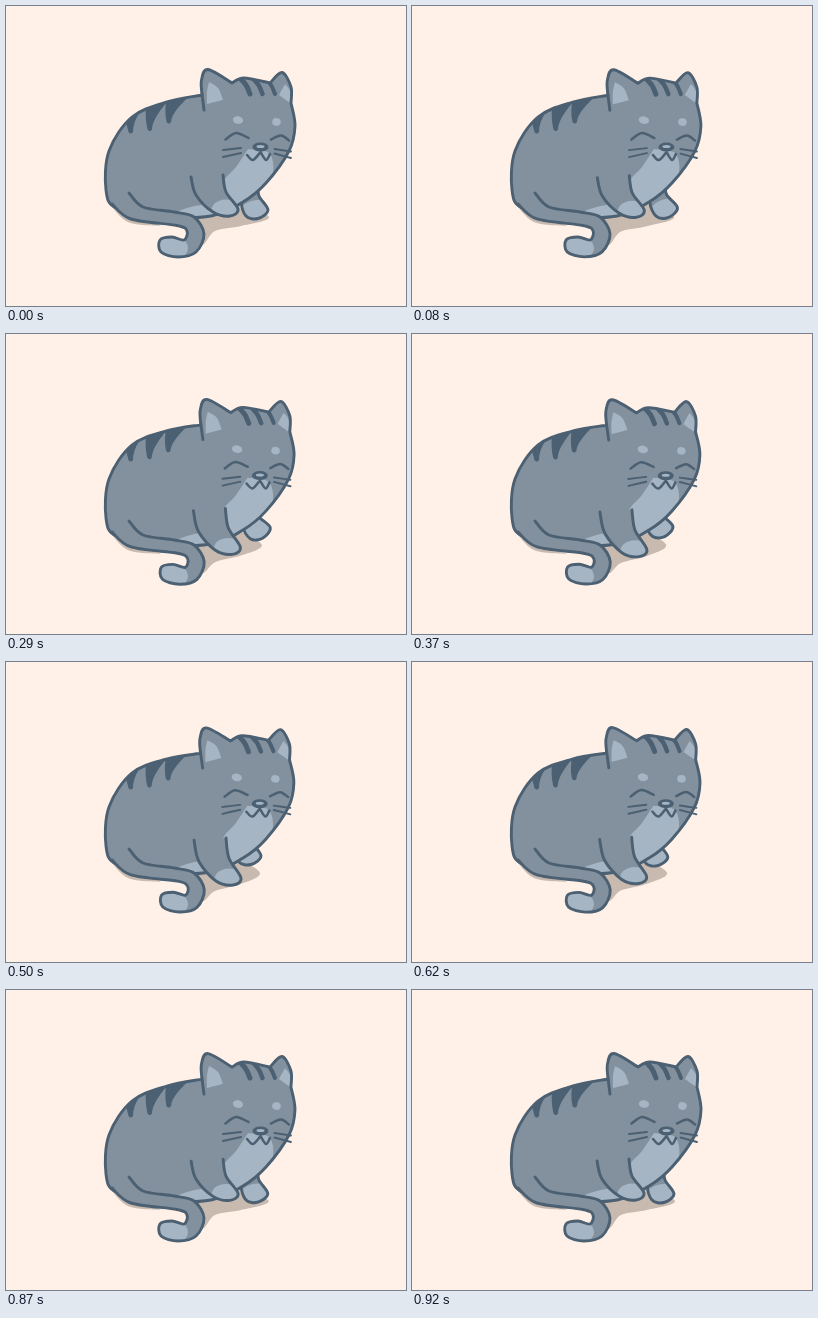
An HTML page with a canvas for the animation above (960 ms loop, 400 by 300 pixels).

```html
<!DOCTYPE html>
<html lang="en">
<head>
<meta charset="utf-8">
<title>Kneading cat</title>
<style>
html, body { margin: 0; width: 100%; height: 100%; overflow: hidden; background: #fff1e8; }
canvas { display: block; width: 400px; height: 300px; }
</style>
</head>
<body>
<canvas id="stage" width="400" height="300"></canvas>
<script>
const ctx = document.getElementById('stage').getContext('2d');
const LOOP = 960;
const COLOR = {
  paper: '#fff1e8', fur: '#83909d', light: '#a6b5c3',
  line: '#4b6072', shadow: '#c9bab0'
};

let press = 0;  // 0: near paw raised, 1: near paw pressed down
let swing = 0;  // outward arc of the far paw while it lifts

const clamp = v => Math.max(0, Math.min(1, v));
const mix = (a, b, k) => a + (b - a) * k;
const ease = k => (1 - Math.cos(Math.PI * clamp(k))) / 2;

// Head sinks a little as the near paw presses; the tail tip pulls in.
function sway(x, y) {
  const head = clamp((x - 120) / 80) * clamp((190 - y) / 100);
  const tail = clamp((y - 212) / 25) * clamp((205 - x) / 30);
  const sink = 2.4 * head * (1 - .6 * clamp((x - 200) / 85));
  return [x + press * (1.8 * tail - 1.6 * head), y + press * (sink - tail)];
}

// The near leg moves down, its paw further than its top.
const knead = (x, y) => [x + 3 * press, y + press * mix(7, 13, clamp((y - 170) / 30))];

const still = (x, y) => [x, y];

// Smooth path through flat point lists; corners fall where lists meet.
function trace(runs, place = sway) {
  const path = new Path2D();
  runs.forEach((run, r) => {
    const pts = [];
    for (let i = 0; i < run.length; i += 2) pts.push(place(run[i], run[i + 1]));
    if (r === 0) path.moveTo(...pts[0]);
    for (let i = 0; i < pts.length - 1; i++) {
      const b = pts[i], c = pts[i + 1];
      const a = pts[i - 1] || b, d = pts[i + 2] || c;
      path.bezierCurveTo(
        b[0] + (c[0] - a[0]) / 6, b[1] + (c[1] - a[1]) / 6,
        c[0] - (d[0] - b[0]) / 6, c[1] - (d[1] - b[1]) / 6, ...c);
    }
  });
  return path;
}

function oval(x, y, rx, ry, turn = 0) {
  const path = new Path2D();
  path.ellipse(x, y, rx, ry, turn, 0, 2 * Math.PI);
  return path;
}

function fill(path, color) {
  ctx.fillStyle = color;
  ctx.fill(path);
}

function stroke(path, width = 2.9) {
  ctx.strokeStyle = COLOR.line;
  ctx.lineWidth = width;
  ctx.stroke(path);
}

// Fur shape with markings clipped to it, then its outline.
function furry(shape, markings) {
  fill(shape, COLOR.fur);
  ctx.save();
  ctx.clip(shape);
  markings();
  ctx.restore();
  stroke(shape);
}

function drawShadow() {
  const edge = 263 - 9 * press, low = 4 * press;
  fill(trace([[102, 196, 122, 216, 155, 220]], still), COLOR.shadow);
  fill(trace([[190, 205, 196, 238, 209, 225 + low, 235, 220 + low / 2, edge, 211, 230, 195]], still), COLOR.shadow);
}

function drawFarLeg() {
  ctx.save();
  ctx.translate(248 - 7 * press + 8 * swing, 202 - 10 * press + swing);
  ctx.rotate(-.25 * swing);
  const leg = trace([[-10, -24, -13, -8, -8, 8, 4, 10.5, 14, 2, 5, -12, 4, -24]], still);
  furry(leg, () => fill(oval(3, 5, 19, 13, -.15), COLOR.light));
  ctx.restore();
}

function drawBody() {
  const body = trace([
    [196, 89, 161, 96, 126, 111, 103, 145, 100, 184, 110, 202, 150, 211, 205, 210,
      237, 196, 260, 177, 283, 145, 289, 120, 285, 97],
    [285, 97, 285, 81, 276, 66.5, 264, 77],
    [264, 77, 238, 72, 226, 77],
    [226, 77, 202, 63.5, 195.5, 74, 196, 89]
  ]);
  furry(body, () => {
    fill(oval(196, 208, 32, 9, -.15), COLOR.light);
    fill(trace([[242, 143], [242, 143, 230, 161, 217, 177, 218, 202],
      [218, 202, 240, 200, 265, 174, 264, 148, 242, 143]]), COLOR.light);
    fill(trace([[203, 76, 201, 86, 201, 98], [201, 98, 217, 94], [217, 94, 212, 82, 203, 76]]), COLOR.light);
    fill(trace([[279, 78, 273, 89], [273, 89, 284, 97], [284, 97, 284, 85, 279, 78]]), COLOR.light);
    drawStripes();
  });
  stroke(trace([[196, 88, 198, 104]]));
}

function drawStripes() {
  for (let i = 0; i < 3; i++) {
    const [x, y] = sway(125 + 19 * i, 127 - 2.5 * i * i);
    const claw = new Path2D();
    claw.moveTo(119 + 21 * i, 116 - 13 * i);
    claw.quadraticCurveTo(x - 5, y - 12, x - 2.5, y - 1);
    claw.quadraticCurveTo(x, y + 2, x + 2, y - 1);
    claw.quadraticCurveTo(x + 2, y - 11, 134 + 27 * i, 106 - 10 * i);
    fill(claw, COLOR.line);

    const top = 232 + 12.5 * i;
    stroke(trace([[top, 70, top + 8, 79, top + 12, 88]]), 5 - .5 * i);
  }
}

function drawNearLeg() {
  const leg = trace([[185, 171, 190, 189, 207, 206, 224, 210, 232, 203, 220, 186, 217, 169]], knead);
  furryOpen(leg, () => fill(oval(...knead(223, 207), 18, 13, .25), COLOR.light));
}

// The canvas leaves unclosed paths open when stroked, so limbs merge with the body.
const furryOpen = furry;

function drawTail() {
  const tail = trace([[123, 187, 137, 201, 168, 206, 188, 211, 198, 228, 190, 246, 172, 251,
    155, 246, 154, 234, 166, 231, 178, 234, 181, 225, 171, 219.5, 125, 213, 106, 198]]);
  furryOpen(tail, () => fill(oval(160, 242, 22, 14), COLOR.light));
}

function drawFace() {
  fill(oval(...sway(232, 114), 5.2, 3.8, .2), COLOR.light);
  fill(oval(...sway(270.5, 116), 4.3, 3.8, .2), COLOR.light);

  stroke(trace([[219.5, 133.5, 230, 127, 242.5, 132]]), 2.5);
  stroke(trace([[265, 133.5, 275, 129.5, 283, 134.5]]), 2.5);
  stroke(trace([[241, 149, 247, 154, 254.5, 146], [254.5, 146, 260, 154, 264, 148]]), 2.5);

  for (const drop of [0, 1]) {
    stroke(trace([[217, 144 + 7 * drop, 235, 142 + 5 * drop]]), 1.9);
    stroke(trace([[268.5, 143 + 4.5 * drop, 285, 145.5 + 6.5 * drop]]), 1.9);
  }
  const [x, y] = sway(254.5, 141);
  fill(oval(x, y, 8, 4.5), COLOR.line);
  fill(oval(x, y - .5, 4, 1.5), COLOR.light);
}

function render(now) {
  const step = Math.floor((now % LOOP + 6) * .024);
  press = ease(step / 10) - ease((step - 13) / 9);
  swing = Math.sin(Math.PI * clamp(step / 12));
  ctx.lineCap = ctx.lineJoin = 'round';
  ctx.fillStyle = COLOR.paper;
  ctx.fillRect(0, 0, 400, 300);
  drawShadow();
  drawFarLeg();
  drawBody();
  drawNearLeg();
  drawTail();
  drawFace();
}

const start = performance.now();
function tick() {
  render(performance.now() - start);
  requestAnimationFrame(tick);
}
tick();
</script>
</body>
</html>
```
